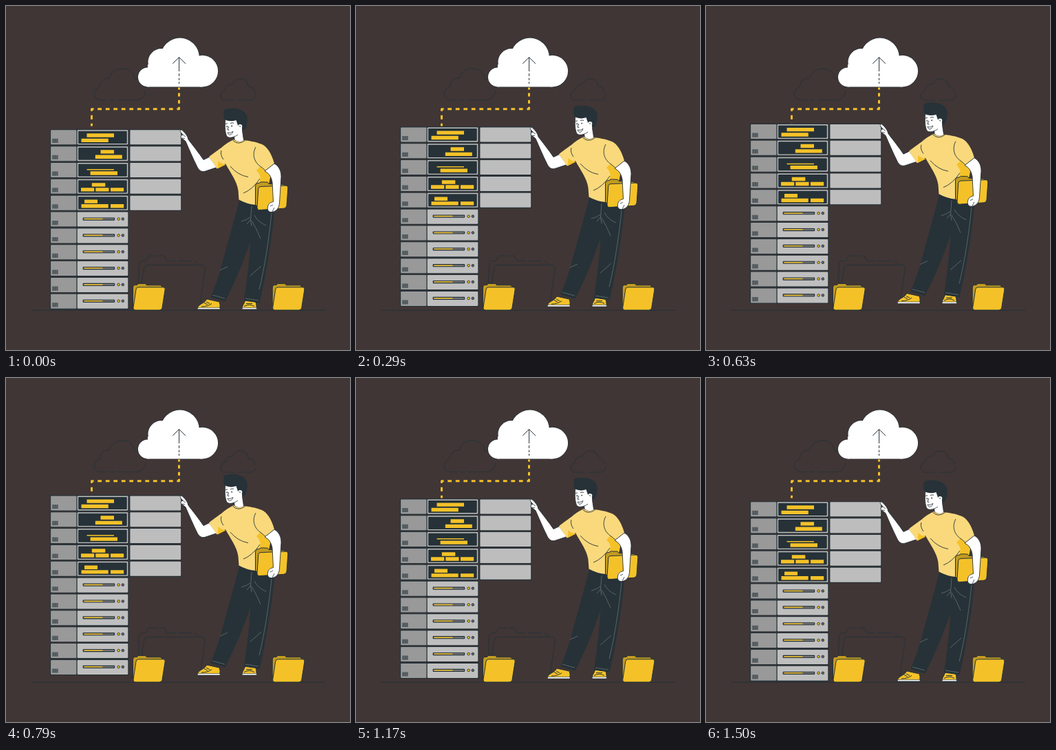
An HTML page with a canvas that plays this animation: 500x500 px, repeating every 1540 ms.

```html
<!DOCTYPE html>
<html lang="en">
<head>
<meta charset="utf-8">
<title>Cloud upload</title>
<style>
html, body { margin: 0; width: 100%; height: 100%; overflow: hidden; background: #403635; }
canvas { display: block; width: 100vw; height: 100vh; }
</style>
</head>
<body>
<canvas id="stage"></canvas>
<script>
const INK = '#263238', GOLD = '#f4c228', DARK_GOLD = '#c39b20', SHIRT = '#f9d97c';
const BACKGROUND = '#403635', SEAM = '#66706f';
const LOOP = 1540, STEPS = 37, CYCLE = 36, RISE = 10;

const canvas = document.getElementById('stage');
const ctx = canvas.getContext('2d');
const density = window.devicePixelRatio || 1;
canvas.width = canvas.height = 500 * density;

function shape(d, fill, stroke = INK, width = 1) {
  const path = new Path2D(d);
  if (fill) {
    ctx.fillStyle = fill;
    ctx.fill(path);
  }
  if (stroke) {
    ctx.strokeStyle = stroke;
    ctx.lineWidth = width;
    ctx.stroke(path);
  }
}

const line = (d, color = INK, width = 1) => shape(d, null, color, width);

function box(x, y, w, h, fill, radius = 0.8) {
  ctx.beginPath();
  ctx.roundRect(x, y, w, h, radius);
  ctx.fillStyle = fill;
  ctx.fill();
}

function disc(x, y, r, fill, stroke = null) {
  ctx.beginPath();
  ctx.arc(x, y, r, 0, Math.PI * 2);
  ctx.fillStyle = fill;
  ctx.fill();
  if (stroke) {
    ctx.strokeStyle = stroke;
    ctx.lineWidth = 0.9;
    ctx.stroke();
  }
}

function shifted(x, y, draw) {
  ctx.save();
  ctx.translate(x, y);
  draw();
  ctx.restore();
}

function drawCloud(grow, color) {
  disc(206, 103.4, 14 + grow, color);
  disc(226, 81.5, 19.5 + grow, color);
  disc(252.8, 74.5, 28 + grow, color);
  disc(285.3, 94.6, 22.8 + grow, color);
  box(206, 85, 79.3, 32.4 + grow, color, 0);
}

function drawSky() {
  line('M147 136.5H138C126 136.5 125 121 136 118C137 108 144 104 150 105C153 95 161 91 169 91C180 91 186 97 187 106C196 106 200 112 201 118');
  line('M151 136.5H158M163 136.5H190C198 136 202 130 203 123');
  line('M333 137H319C310 137 310 125 318 123C319 116 324 113 329 114C332 108 336 106 340 106C348 106 352 111 352 117C358 117 361 121 362 126');
  line('M338 137H356C360 136 363 133 363.5 129');
  drawCloud(0.7, INK);
  drawCloud(0, '#fff');
  line('M242.3 83.8L251.6 74.5L261 83.8M251.6 75V95M251.6 98V102M251.6 104.5V108M251.6 110V113');
}

// Dashes run between solid corner stubs with equal dash and gap.
function drawRoute() {
  line('M251.5 118.5V121.5M251.5 146.8V149.8H248.5M127.5 149.8H124.5V152.8', GOLD, 3);
  const runs = [['M251.5 121.5V146.8', 5.06], ['M127.5 149.8H248.5', 5.76], ['M124.5 152.8V174.5', 5.95]];
  for (const [path, dash] of runs) {
    ctx.setLineDash([dash]);
    ctx.lineDashOffset = dash;
    line(path, GOLD, 3);
  }
  ctx.setLineDash([]);
}

function drawGhostFolder() {
  line('M192.5 404L193.3 377Q193.5 371 198 370.5H203L206 365Q207 363 210 363H219M222 363H229Q231 363 232 366L234 370.3H246M250 370.5H270M274 371Q279 371.5 280 376');
  line('M197 404L201 380Q201.8 376.5 206 376.5H284Q290 376.5 289.3 382L281.5 436');
}

function drawFolder() {
  shape('M.5 35V7Q.5 2.5 4 2.5H6.5L8 .5H18.5L20.5 2.8H40Q43 3 43.5 7L40 37H3Q.5 38 .5 35Z', DARK_GOLD);
  shape('M8.5 5.8H44.6Q47.7 5.8 47.2 9L43 35.8Q42.4 39 39 39H4Q.5 39 1 35.5L5 9Q5.5 5.8 8.5 5.8Z', GOLD);
}

// Bars of each screen: x, y within the unit, width, optional height.
const SCREENS = [
  [[117.5, 6.1, 39.5], [109.5, 13.5, 39.3]],
  [[137.5, 6.1, 19.5], [129.8, 13.5, 39]],
  [[117.5, 10.1, 39.5, 1.5], [122.6, 13.4, 39.4]],
  [[124.8, 6.4, 19.5], [109, 13.4, 19.2], [130.3, 13.4, 19.2], [152, 13.4, 19.2]],
  [[114, 6.8, 19], [109.5, 13.5, 39.2], [152, 13.5, 19.2]]
];

function drawControls(y) {
  box(111.6, y + 9, 46.6, 4.2, INK, 1);
  box(112.7, y + 10.1, 44.4, 2, '#777', 0.5);
  box(113.5, y + 10.3, 27, 1.5, GOLD, 0.5);
  disc(163.6, y + 11.1, 1.8, GOLD, INK);
  disc(169.8, y + 11.1, 1.8, '#666', INK);
}

function drawServer() {
  const pitch = 23.85, height = 23.2;
  for (let row = 0; row < 11; row++) {
    const y = 179.2 + row * pitch;
    box(64, y, 114.4, height, INK, 1.2);
    box(65.1, y + 1.1, 37.3, height - 2.2, '#999');
    box(103.7, y + 1.1, 73.6, height - 2.2, '#bfbfbf');
    for (let i = 0; i < 5; i++) box(67.4 + i * 1.75, y + 13.6, 1, 6.2, INK, 0);

    const bars = SCREENS[row];
    if (bars) {
      box(105.1, y + 2.6, 70.7, 18.2, INK);
      for (const [x, dy, w, h = 5.4] of bars) box(x, y + dy, w, h, GOLD, 0.3);
      box(179.3, y, 76, height, INK, 1.2);
      box(180.4, y + 1.1, 73.8, height - 2.2, '#bdbdbd');
    } else {
      drawControls(y);
    }
  }
}

function drawLegs() {
  // Shoes
  shape('M292 426L310 430Q312 434 310.5 440.5H278.5Q278 436 283 433.5Q289 431 292 426Z', GOLD);
  shape('M278.5 438.4H311V440.8H278.5Z', '#fff', INK, 0.6);
  line('M288 431.5L293 434M291 430L296 432.5M284 437Q293 437 299 432.5', INK, 1);
  shape('M348 427H362Q364.5 433 364.3 440.5H343.3Q343 436 346 432Z', GOLD);
  shape('M343.3 438.4H364.3V440.8H343.3Z', '#fff', INK, 0.6);
  line('M349 432.5H358M346 436.5Q354 432 361 436.5', INK, 1);

  shape('M340 281C334 305 321 350 313 381C308 397 302 414 298 423L318 429C331 404 344 374 356 338C355 366 350 404 346.5 428L368 431C377 395 387 332 390 294L365 285Z', INK);
  line('M357 291L355.5 311L357 320M342 313Q350 311 355 307M350 317L356 310M361 304Q366 314 378 319M357 312Q365 325 370 338M386 301C382 340 376 380 368 412M311 384L322 379M355 392L371 378M300 420L318 425M348 425L367 428', SEAM, 0.8);
}

function drawTorso() {
  shape('M331 194C325 197 318 201 313 206C306 211 299 216 295 219.5L306.5 236.5L319 229C326 242 336 255 337.5 268L338.5 281.5Q350 288 363 289L381 256L376 240L390 229C386 214 379 204 372 201C362 197 353 196 346 195Q337 200 331 194Z', SHIRT, null);
  shape('M307.5 236.5L319.5 230.5Q312 229 308.5 225Z', GOLD, null);
  shape('M370 233L377 240L387 235L382 259L366 259Q374 249 364 239Z', GOLD, null);
  line('M313 210Q311 216 316 223M363 205C357 216 361 228 371 234L378 240M326 233Q337 246 352 248.5M345 272Q358 267 369 251', INK, 0.9);
  line('M329.5 195Q337 203 347.5 195.5', INK, 0.9);
}

function drawReachingArm() {
  shape('M295.5 219.5L287 223.5C280 213 271 202 265 194C264 189 261 185 257 181.5C254.5 178.5 252 180.5 254 183.5L257 187C253.5 188 253 191 256.5 193L261 196.5C266 208 272 222 278 234C281 240 285 241.5 290 240L306.5 234.5Z', '#fff', INK, 0.9);
  line('M257 187L261 190M256 192L260 192.5', INK, 0.8);
}

function drawHoldingArm() {
  shifted(362, 255.5, () => {
    shape('M.5 33V6Q.5 2 4 2L7 1.5L8 .3L18 .5L20 3L43 4L40 37H4Z', DARK_GOLD);
    shape('M8 7L45 5.5Q48 5.5 47.8 9L46 34.5Q45.5 38.2 42 38.7L6 41Q2.7 41 3 37L4.8 10Q5 7.2 8 7Z', GOLD);
  });
  shape('M376 240L390 229C397 233 400 240 400 248L397.5 286C397 293 394 298 387 299.5C382 300 379.5 297 380.5 292C381 287 385 285 388.5 284.5L387 256Q385 244 376 240Z', '#fff', INK, 0.9);
  line('M384 291L388 289M387 299L390 293', INK, 0.8);
}

function drawHead() {
  shape('M332 187V194Q338 199.5 345.5 195L343 179Z', '#fff', null);
  line('M332 191V194.5M343.5 181L345.5 195', INK, 0.8);
  shape('M319 164C318 172 318 181 320 187C321 191 325 192 330 190.5C336 189 341 184 343 180V163L327 160Z', '#fff', null);
  line('M319 164C318 172 318 181 320 187C321 191 325 192 330 190.5Q334 189.5 337 187', INK, 0.8);
  shape('M317.5 167C316 159 315 152 318.5 150C326 147.5 338 148 345 153C351 157 352 165 350 171C349.5 176 348 180 344 181L342.5 176Q341 169 337.5 175L334.5 166Q326 169 317.5 165Z', INK, null);
  disc(340.2, 175, 3.1, '#fff');
  line('M338.8 175Q340.5 173 341 176', INK, 0.7);
  disc(321.3, 175.2, 0.95, INK);
  disc(328.2, 174.5, 0.95, INK);
  line('M319 171.3L322 170.8M326 170.7Q328.5 169 331 170.3M323.7 175L322 180L324.3 180.4', INK, 0.9);
  shape('M321.8 184Q326 185.5 330 182.4Q328 188 324.3 187.2Z', '#fff', INK, 0.8);
}

function drawMan() {
  drawLegs();
  drawReachingArm();
  drawTorso();
  drawHoldingArm();
  drawHead();
}

// Linear rise and fall, held between the steps of the loop.
function lift(time) {
  const step = Math.floor((time % LOOP + 2) / (LOOP / STEPS));
  const phase = ((step + 0.5) % CYCLE) / CYCLE;
  return RISE * (1 - Math.abs(1 - 2 * phase)) - RISE / CYCLE;
}

function render(time) {
  ctx.setTransform(density, 0, 0, density, 0, 0);
  ctx.fillStyle = BACKGROUND;
  ctx.fillRect(0, 0, 500, 500);
  ctx.lineJoin = 'round';
  drawSky();
  line('M36.5 442.3H464', INK, 1.2);
  drawGhostFolder();
  drawRoute();
  shifted(184, 403, drawFolder);
  shifted(386.7, 403, drawFolder);
  shifted(0, -lift(time), () => {
    drawServer();
    drawMan();
  });
}

const start = performance.now();
function tick() {
  render(performance.now() - start);
  requestAnimationFrame(tick);
}
tick();
</script>
</body>
</html>
```
